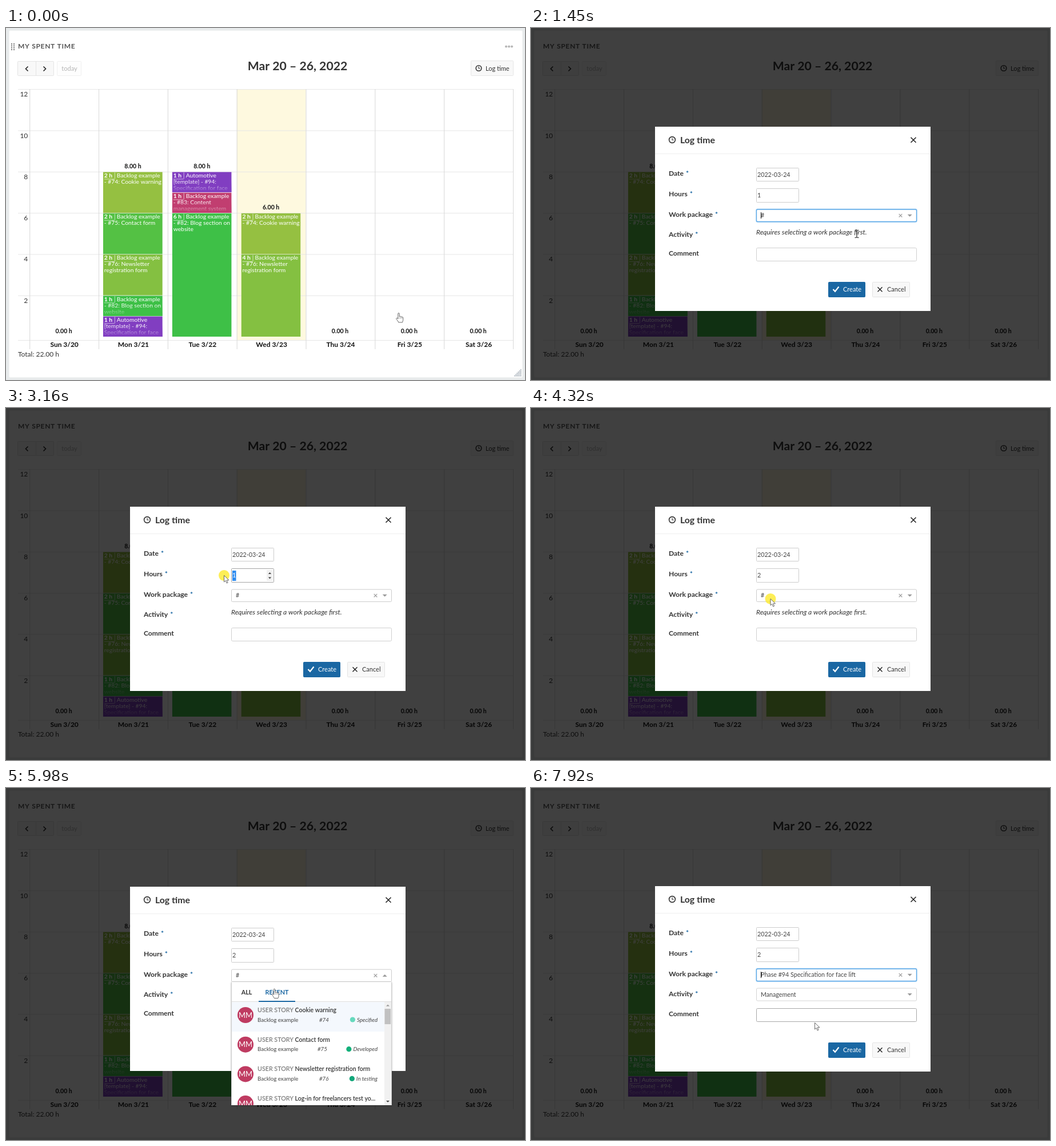
An HTML page with a canvas for the animation above (8000 ms loop, 908 by 617 pixels).

```html
<!DOCTYPE html>
<html lang="en">
<head>
<meta charset="utf-8">
<title>Log time</title>
<style>
html, body { margin: 0; width: 100%; height: 100%; overflow: hidden; background: #e8ebec; }
canvas { display: block; width: 908px; height: 617px; }
</style>
</head>
<body>
<canvas id="stage" width="908" height="617"></canvas>
<script>
const ctx = document.getElementById('stage').getContext('2d');
const LOOP = 8000;
const INK = '#333', BLUE = '#1a67a3', GRID = '#e6e6e6';
const HOUR = 36.15, BASE = 541.5, LEFT = 41.2, COL = 120.83;
const colX = i => LEFT + i * COL;

// ---- helpers ----
function rect(x, y, w, h, fill) {
  ctx.fillStyle = fill;
  ctx.fillRect(x, y, w, h);
}
function box(x, y, w, h, fill, border, r = 1, lw = 1) {
  ctx.beginPath();
  ctx.roundRect(x + .5, y + .5, w - 1, h - 1, r);
  if (fill) { ctx.fillStyle = fill; ctx.fill(); }
  if (border) { ctx.strokeStyle = border; ctx.lineWidth = lw; ctx.stroke(); }
}
function text(s, x, y, size, color = INK, weight = 400, align = 'left', style = '') {
  ctx.font = `${style} ${weight} ${size}px Lato, "Open Sans", sans-serif`;
  ctx.fillStyle = color;
  ctx.textAlign = align;
  ctx.fillText(s, x, y);
  return ctx.measureText(s).width;
}
function line(points, color, lw) {
  ctx.beginPath();
  points.forEach(([x, y], i) => i ? ctx.lineTo(x, y) : ctx.moveTo(x, y));
  ctx.strokeStyle = color;
  ctx.lineWidth = lw;
  ctx.stroke();
}
function disc(x, y, r, fill) {
  ctx.beginPath();
  ctx.arc(x, y, r, 0, 7);
  ctx.fillStyle = fill;
  ctx.fill();
}
function cross(x, y, r, color, lw) {
  line([[x - r, y - r], [x + r, y + r]], color, lw);
  line([[x - r, y + r], [x + r, y - r]], color, lw);
}
function tri(x, y, w, h, color) {
  ctx.beginPath();
  ctx.moveTo(x - w, y - h / 2);
  ctx.lineTo(x + w, y - h / 2);
  ctx.lineTo(x, y + h / 2);
  ctx.fillStyle = color;
  ctx.fill();
}
function clock(x, y, r, lw) {
  ctx.beginPath();
  ctx.arc(x, y, r, 0, 7);
  ctx.strokeStyle = INK;
  ctx.lineWidth = lw;
  ctx.stroke();
  line([[x, y - r * .6], [x, y + .3], [x + r * .5, y + .3]], INK, 1.1);
}
// progress in n discrete steps, the first at a and the last at b
const ramp = (t, a, b, n) =>
  Math.min(n, Math.max(0, Math.floor((t - a) / ((b - a) / (n - 1)) + 1e-6) + 1)) / n;
const ease = p => p * p * (3 - 2 * p);
const between = (t, a, b) => t >= a && t < b;

// ---- calendar ----
const OLIVE = '#95c041', LIME = '#84c041', LEAF = '#54c144', GREEN = '#3ec047',
      PURPLE = '#813ec1', ROSE = '#c13e70';
const auto = ['Automotive', '[template] - #94:', 'Specification for face'];
const story = (...rest) => ['Backlog example', ...rest];
const letter = story('- #76: Newsletter', 'registration form');
// column, top hour, length, colour, lines
const entries = [
  [1, 8, 2, OLIVE, story('- #74: Cookie warning')],
  [1, 6, 2, LEAF, story('- #75: Contact form')],
  [1, 4, 2, LIME, letter],
  [1, 2, 1, GREEN, story('- #82: Blog section on', 'website')],
  [1, 1, 1, PURPLE, auto],
  [2, 8, 1, PURPLE, auto],
  [2, 7, 1, ROSE, story('- #83: Content', 'management system')],
  [2, 6, 6, GREEN, story('- #82: Blog section on', 'website')],
  [3, 6, 2, OLIVE, story('- #74: Cookie warning')],
  [3, 4, 4, LIME, letter],
];
const totals = [0, 8, 8, 6, 0, 0, 0];
const days = ['Sun', 'Mon', 'Tue', 'Wed', 'Thu', 'Fri', 'Sat'];

function entry([col, top, hours, color, lines]) {
  const x = colX(col) + 7.8, y = BASE - top * HOUR, h = hours * HOUR;
  ctx.save();
  ctx.beginPath();
  ctx.rect(x, y, 104, h - .6);
  ctx.clip();
  rect(x, y, 104, h, color);
  text(hours + ' h', x + 2, y + 9.5, 10.3, '#fff', 700);
  rect(x + 2, y + 12, 18, 1, 'rgba(255,255,255,.6)');
  rect(x + 20, y + 1, 1, 11, 'rgba(255,255,255,.6)');
  lines.forEach((s, i) => text(s, x + (i ? 2 : 24), y + 9.5 + i * 10.9, 10.3, '#fff'));
  if (hours === 1) {
    const g = ctx.createLinearGradient(0, y + 15, 0, y + h);
    g.addColorStop(0, color + '00');
    g.addColorStop(1, color);
    rect(x, y + 13, 104, h, g);
  }
  ctx.restore();
}

function calendar(t, dim) {
  rect(0, 0, 908, 617, '#e8ebec');
  box(5, 4, 899, 609, '#fff', '#f2f3f3', 2);
  ctx.letterSpacing = '0.7px';
  text('MY SPENT TIME', 21, 36, 12, '#555', 700);
  ctx.letterSpacing = '0px';
  if (!dim) {
    for (let i = 0; i < 8; i++) rect(9 + i % 2 * 4, 27 + (i >> 1) * 3.3, 2, 2, '#777');
    for (let i = 0; i < 3; i++) disc(875 + i * 5, 32.5, 2.1, '#b8b8b8');
    for (let r = 0; r < 6; r++)
      for (let c = 5 - r; c < 6; c++) rect(889 + c * 2.2, 598 + r * 2.2, 1.4, 1.4, '#8d99a5');
  }

  box(20, 58, 64, 26, '#f8f8f8', '#e4e4e4');
  rect(52, 58, 1, 26, '#e4e4e4');
  line([[38.5, 67.5], [34.5, 71.5], [38.5, 75.5]], '#222', 1.6);
  line([[65.5, 67.5], [69.5, 71.5], [65.5, 75.5]], '#222', 1.6);
  box(89, 58, 43, 26, '#fdfdfd', '#f0f0f0');
  text('today', 111, 74.5, 11, '#b4b4b4', 400, 'center');
  text('Mar 20 – 26, 2022', 510, 74.3, 21.2, INK, 700, 'center');
  box(813, 57, 75, 27, '#f8f8f8', '#e6e6e6');
  clock(827, 70.5, 4.8, 1.6);
  text('Log time', 839, 74.5, 11);

  rect(colX(3), 107, COL, 440, '#fef9df');
  for (let i = 0; i < 6; i++) {
    const y = 107.2 + i * 72.3;
    rect(21, y, 867, 1, GRID);
    text(12 - i * 2, 38.3, y + 13, 12, INK, 400, 'right');
  }
  rect(21, 547, 867, 1, GRID);
  for (let i = 0; i < 8; i++) rect(colX(i), 107, 1, 456, '#d8d8d8');

  if (t >= 1380) rect(532.5, 107, 103.5, 416, '#e9e9e9');
  if (t >= 600) {
    line([[582, 315.5], [591, 315.5]], '#222', 1.3);
    line([[586.5, 311], [586.5, 320]], '#222', t < 830 ? 1 : 1.3);
  }
  entries.forEach(entry);
  days.forEach((d, i) => {
    const x = colX(i) + COL / 2;
    text(totals[i].toFixed(2) + ' h', x - .5, BASE - 6.5 - totals[i] * HOUR, 10.5, '#111', 700, 'center');
    text(`${d} 3/${20 + i}`, x + .5, 558.5, 12, '#111', 700, 'center');
  });
  text('Total: 22.00 h', 21, 576, 12);
}

// ---- dialog ----
const DOTS = { Specified: '#66d9bd', Developed: '#13b07a', 'In testing': '#12a67a', Closed: '#dfe1e6' };
// type, name, project, id, id position, status
const US = 'USER STORY', BE = 'Backlog example';
const allItems = [
  [US, 'Cookie warning', BE, 74, 548, 'Specified'],
  [US, 'Contact form', BE, 75, 545, 'Developed'],
  [US, 'Newsletter registration form', BE, 76, 548, 'In testing'],
  [US, 'Log-in for freelancers test yo...', BE, 77, 548, 'Specified'],
];
const recentItems = [
  ['PHASE', 'Specification for face lift', 'Automotive [template]', 94, 565, 'Closed'],
  [US, 'Blog section on website', BE, 82, 548, 'Specified'],
  allItems[2],
  allItems[1],
];

function label(s, y, required) {
  const w = text(s, 241, y, 12.1, INK, 700);
  if (required) text('*', 241 + w + 4, y, 12, BLUE, 700);
}

function item([type, name, project, id, idX, status], i) {
  const y = 375.5 + i * 51.7;
  if (!i) rect(395, y, 267, 51.5, '#f4f8fd');
  disc(419, y + 22.5, 14, '#bf3b61');
  text('MM', 419, y + 27, 13, '#fff', 400, 'center');
  const w = text(type, 440, y + 17.5, 10.7, type === US ? '#7d7d7d' : BLUE, 600);
  text(name, 440 + w + 2.5, y + 17.5, 10.5, INK, 600);
  text(project, 440, y + 34, 9.7, '#444');
  text('#' + id, idX, y + 34, 9.7, '#444', 400, 'left', 'italic');
  const sw = text(status, 650, y + 34, 9.7, '#444', 400, 'right', 'italic');
  disc(650 - sw - 7.5, y + 30.5, 4.6, DOTS[status]);
}

function tab(s, x, left, right, active, under) {
  text(s, x, 362, 10.8, active ? BLUE : INK, 700, 'center');
  if (under) rect(left, 373, right - left, 2, BLUE);
}

function dropdown(t, hover) {
  const recent = t >= 5810, loaded = t >= 6510;
  ctx.save();
  ctx.shadowColor = 'rgba(0,0,0,.25)';
  ctx.shadowBlur = 3;
  ctx.shadowOffsetY = 1;
  rect(394, 340, 281, 216, '#fff');
  ctx.restore();
  ctx.save();
  ctx.beginPath();
  ctx.rect(394, 340, 281, 216);
  ctx.clip();
  box(394, 339, 281, 218, null, '#ccc');
  rect(395, 374, 279, 1, '#ddd');
  tab('ALL', 421, 400, 442, !recent, !recent);
  tab('RECENT', 474, 442, 506, recent || hover, recent || hover);
  (loaded ? recentItems : allItems).forEach(item);
  rect(662, 375, 12, 181, '#f1f1f1');
  rect(662.5, 387, 10.5, loaded ? 68 : 27, '#c1c1c1');
  tri(668, 381, 3, -3, '#999');
  tri(668, 549.5, 3, 3, '#444');
  ctx.restore();
}

function hoursField(t, y) {
  const active = between(t, 2870, 4250);
  const typed = t >= 3710, selected = between(t, 3090, 3710);
  box(394, y, 75, 25, '#fff', active ? '#a5a5a5' : '#ccc');
  if (selected) rect(396, y + 4, 6.5, 18, '#2f8cf0');
  text(typed ? '2' : '1', 396, y + 16, 10.7, selected ? '#fff' : '#444');
  if (!active) return;
  rect(456, y + 3, 11, 19, '#f1f1f1');
  tri(461.5, y + 8.5, 2.6, -3, '#444');
  tri(461.5, y + 17, 2.6, 3, '#444');
  if (typed) rect(402.5, y + 6, 1, 12, '#222');
}

function caretOn(t) {
  if (t < 2870) return Math.floor((t - 1450) / 535) % 2 === 0;
  if (t < 4330) return false;
  return t >= 7450 || Math.floor((t - 4390 + 1060) / 530) % 2 === 0;
}

function dialog(t, hover) {
  const done = t >= 7450, picked = t >= 7530, grown = t >= 7680 ? 1 : 0;
  const open = between(t, 4330, 7450), focus = t < 2940 || done;
  rect(217, 173 - grown, 482, 323 + 2 * grown, '#fff');

  ctx.save();
  ctx.translate(0, -grown);
  clock(247, 196, 5.4, 1.6);
  text('Log time', 261, 201.5, 15.8, INK, 700);
  cross(669, 196.2, 4.5, '#222', 1.6);
  rect(217, 220, 482, 1, '#eee');
  label('Date', 259, true);
  box(394, 245, 75, 24, '#fff', '#ccc');
  text('2022-03-24', 396, 260.5, 10.7, '#444');
  label('Hours', 295, true);
  hoursField(t, 281);
  label('Work package', 331, true);
  if (focus) box(393, 316.5, 283, 24.5, null, 'rgba(90,170,235,.25)', 3, 1.5);
  box(394, 317.5, 281, 22.5, '#fff', focus ? '#56a5e6' : '#ccc', 2, focus ? 1.3 : 1);
  text(done ? 'Phase #94 Specification for face lift' : '#', 402, 332.3, 10.7, '#444');
  if (caretOn(t)) rect(402, 323, 1, 11, '#111');
  cross(646.5, 328.7, 2.8, '#999', 1.1);
  tri(662.7, 328.7, 4, open ? -4 : 4, '#999');
  label('Activity', 365.5, true);
  if (picked) {
    box(394, 351.5, 281, 23, '#fff', '#d4d4d4', 2);
    text('Management', 402, 367, 10.7, '#444');
    tri(662.7, 363, 4, 4, '#999');
  } else {
    text('Requires selecting a work package first.', 394, 361.5, 12, INK, 400, 'left', 'italic');
  }
  ctx.restore();

  ctx.save();
  ctx.translate(0, grown);
  label('Comment', 398.5);
  box(394, 385, 281, 24, '#fff', picked ? '#a8a8a8' : '#d0d0d0', 2);
  box(520, 445, 65, 27, BLUE, BLUE, 1);
  line([[528.5, 458], [532, 461.8], [538.5, 453.5]], '#fff', 2.2);
  text('Create', 546, 462, 11, '#fff');
  box(597, 445, 66, 27, '#f8f8f8', '#e4e4e4', 1);
  cross(610.5, 458.2, 4, '#222', 1.5);
  text('Cancel', 623, 462, 11);
  ctx.restore();

  if (open) dropdown(t, hover);
}

// ---- pointer ----
const ARROW = new Path2D('M0 0V11.5L2.7 9L4.6 13.5L6.6 12.6L4.7 8.3H8.5Z');
const HAND = new Path2D('M-1.2 8V-1.2a1.2 1.2 0 0 1 2.4 0V4a1.2 1.2 0 0 1 2.3.3a1.2 1.2 0 0 1 2.2.5' +
  'a1.2 1.2 0 0 1 2 .8V9.5Q7.7 11 6.5 14H-.2Q-1.5 11-4 8.2a1.2 1.2 0 0 1 2-1.4Z');
// start, end, steps, x, y
const moves = [
  [80, 680, 9, 568.5, 359.5],
  [2240, 2870, 9, 407, 293.5],
  [3090, 3160, 2, 381.5, 293.5],
  [3790, 4020, 4, 419, 334.5],
  [4960, 5430, 7, 469.5, 354.5],
  [6910, 7220, 5, 471.5, 397.5],
  [7850, 7920, 2, 496.5, 411.5],
];
const clicks = [[1000, 1240], [2940, 3480], [4250, 4490], [5660, 5810], [7300, 7450]];

function pointer(t) {
  let x = 687, y = 502;
  for (const [a, b, n, tx, ty] of moves) {
    if (t < a) break;
    const p = ease(ramp(t, a, b, n));
    x += (tx - x) * p;
    y += (ty - y) * p;
  }
  let kind = 'arrow';
  if (t < 1380) kind = x > 600 ? 'hand' : 'beam';
  else if (t < 2310 || between(t, 2800, 3090) || between(t, 7450, 7850)) kind = 'beam';
  else if (between(t, 4960, 7450) && y > 343) kind = 'hand';
  return { x, y, kind };
}

function drawPointer(t, { x, y, kind }) {
  if (clicks.some(([a, b]) => between(t, a, b))) disc(x, y, 9.5, 'rgba(253,233,40,.78)');
  ctx.save();
  ctx.translate(x, y);
  if (kind === 'beam') {
    ctx.translate(1.5, 1.5);
    line([[0, -6], [0, 6]], '#222', 1.2);
    line([[-3.5, -6.5], [-1, -6.5], [0, -5.7], [1, -6.5], [3.5, -6.5]], '#222', 1);
    line([[-3.5, 6.5], [-1, 6.5], [0, 5.7], [1, 6.5], [3.5, 6.5]], '#222', 1);
  } else {
    const path = kind === 'hand' ? HAND : ARROW;
    ctx.fillStyle = '#fff';
    ctx.fill(path);
    ctx.strokeStyle = '#444';
    ctx.lineWidth = .8;
    ctx.stroke(path);
    if (kind === 'hand') for (let i = 0; i < 3; i++) line([[1.3 + i * 2.2, 5], [1.3 + i * 2.2, 7.5]], '#666', .6);
  }
  ctx.restore();
}

function draw(now) {
  const t = now % LOOP, modal = t >= 1450, p = pointer(t);
  calendar(t < 1450 ? t : 0, modal);
  if (modal) {
    rect(0, 0, 908, 617, 'rgba(0,0,0,.75)');
    dialog(t, p.kind === 'hand' && p.y < 375);
  }
  drawPointer(t, p);
}

let start;
function tick(now) {
  start ??= now;
  draw(now - start);
  requestAnimationFrame(tick);
}
draw(0);
requestAnimationFrame(tick);
</script>
</body>
</html>
```
